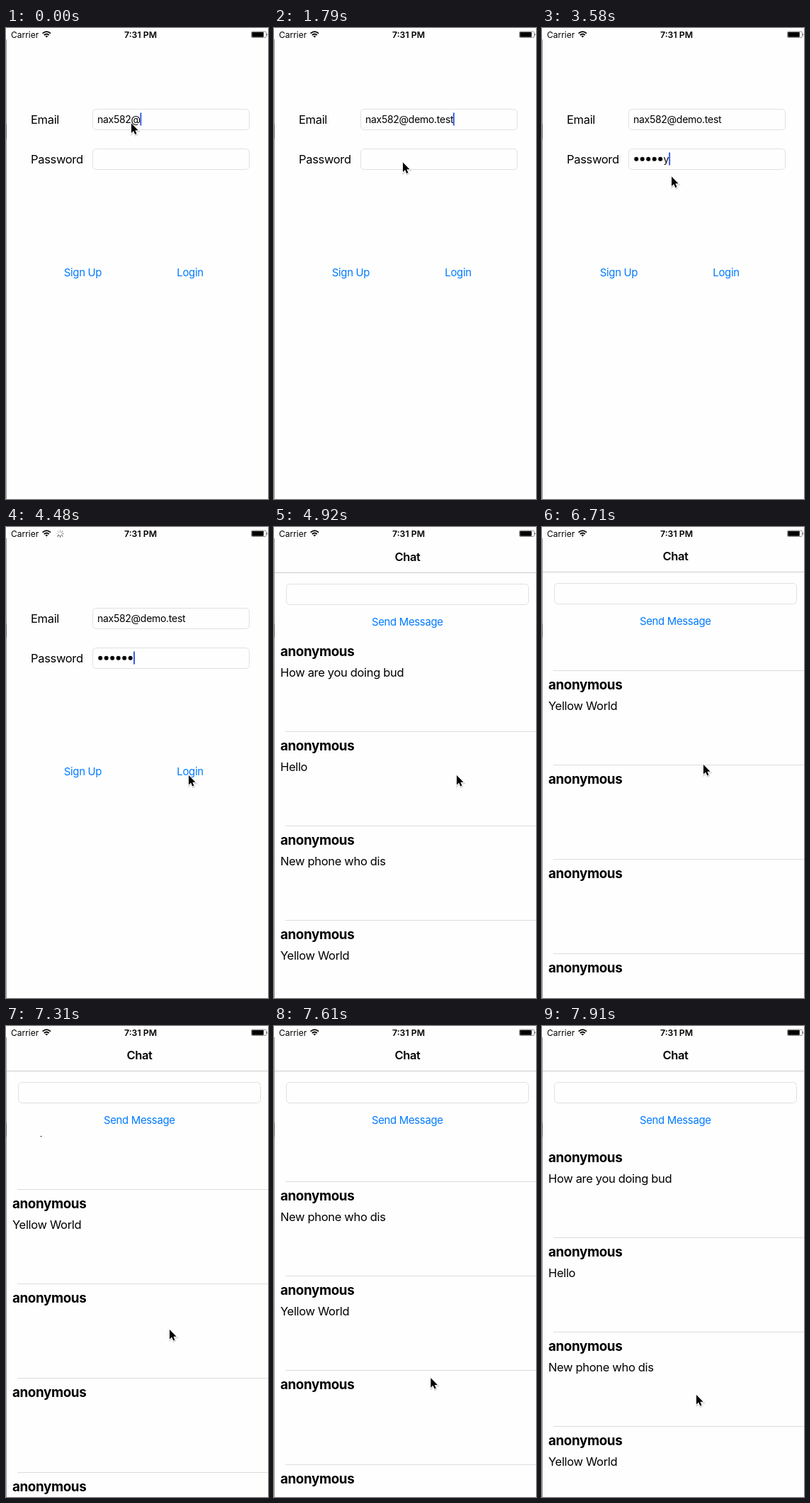
Recreate the animation shown at these times as an HTML page. Size 370 by 664 pixels, loop 8000 ms.

```html
<!DOCTYPE html>
<html lang="en">
<head>
<meta charset="utf-8">
<title>Login and chat</title>
<style>
  html, body { margin: 0; width: 100%; height: 100%; overflow: hidden; background: #fff; }
  svg { display: block; width: 100%; height: 100%; }
  text { font-family: Inter, Roboto, sans-serif; letter-spacing: -.02em; white-space: pre; }
  .label { font-size: 16.5px; }
  .name { font-size: 18.8px; font-weight: 700; }
  .title { font-size: 16.5px; font-weight: 600; text-anchor: middle; }
  .button { font-size: 14.9px; fill: #007aff; text-anchor: middle; }
  .input { font-size: 14px; }
  .status { font-size: 12px; letter-spacing: 0; }
  .clock { font-size: 12.3px; font-weight: 600; text-anchor: middle; }
  .field { fill: #fefefe; stroke: #e0e0e0; }
  .caret { fill: #3a5fe0; }
</style>
</head>
<body>
<svg id="stage" viewBox="0 0 370 664">
  <defs>
    <clipPath id="list"><rect y="155" width="370" height="509"/></clipPath>
    <path id="arrow" d="M0 0V14.6L3.4 11.4L5.7 16.6L8 15.6L5.8 10.6H10.3Z" transform="scale(.93)"/>
  </defs>
  <rect width="370" height="664" fill="#fefefe"/>
  <g id="login"></g>
  <g id="chat">
    <rect width="370" height="664" fill="#fefefe"/>
    <g clip-path="url(#list)"><g id="rows"></g></g>
    <path d="M0 63.5H370" stroke="#cdcdcd"/>
  </g>
  <g id="bar">
    <g fill="none" stroke="#000" stroke-width="1.8">
      <path d="M51.6 7.6Q57.3 2.6 63 7.6M53.8 10Q57.3 6.9 60.8 10"/>
      <path d="M55.4 11.4Q57.3 9.9 59.2 11.4L57.3 13.6Z" fill="#000" stroke="none"/>
    </g>
    <rect x="346.5" y="5" width="21" height="8.5" rx="1.6" fill="#fff" stroke="#555" stroke-width=".6"/>
    <rect x="347.3" y="5.8" width="16.5" height="6.9" rx=".6"/>
    <path d="M368.4 7.5q1.6 1.7 0 3.5z"/>
    <g id="spinner" stroke="#555" stroke-width="1.2" stroke-linecap="round"></g>
  </g>
  <path d="M.5 16V664" stroke="#999"/>
  <path d="M.5 136V156" stroke="#6e6e6e"/>
  <g id="pointer">
    <use href="#arrow" x=".5" y="1.2" fill="none" stroke="#000" stroke-opacity=".16" stroke-width="2.6"/>
    <use href="#arrow" stroke="#fff" stroke-width="1.8" stroke-linejoin="round" paint-order="stroke"/>
  </g>
</svg>
<script>
const LOOP = 8000, STEP = 149.2, ROW = 133;
const $ = id => document.getElementById(id);

function add(parent, tag, attrs, content = '') {
  const node = document.createElementNS('http://www.w3.org/2000/svg', tag);
  for (const key in attrs) node.setAttribute(key, attrs[key]);
  node.textContent = content;
  return parent.appendChild(node);
}
const text = (parent, cls, x, y, content) => add(parent, 'text', { class: cls, x, y }, content);
const box = (parent, x, y, width) =>
  add(parent, 'rect', { class: 'field', x, y, width, height: 29, rx: 5 });
const show = (node, on) => node.setAttribute('visibility', on ? 'visible' : 'hidden');
const toggle = (node, on) => node.setAttribute('display', on ? 'inline' : 'none');
const move = (node, x, y) => node.setAttribute('transform', `translate(${x} ${y})`);

// Login screen
const login = $('login');
function input(label, y) {
  text(login, 'label', 35, y + 20, label);
  box(login, 122.5, y, 221);
  return {
    value: text(login, 'input', 129, y + 19, ''),
    dots: add(login, 'g', {}),
    caret: add(login, 'rect', { class: 'caret', y: y + 5, width: 2, height: 18 })
  };
}
const email = input('Email', 114.5);
const password = input('Password', 170.5);
text(login, 'button', 108.5, 350, 'Sign Up');
const loginButton = text(login, 'button', 260, 350, 'Login');
for (let i = 0; i < 6; i++) add(password.dots, 'circle', { cx: 133.2 + 8.5 * i, cy: 184.7, r: 3 });

// Chat screen
const chat = $('chat'), rows = $('rows');
text(chat, 'title', 188.5, 47, 'Chat');
box(chat, 17.5, 79.5, 342);
text(chat, 'button', 188.3, 137.5, 'Send Message');
const messages = ['How are you doing bud', 'Hello', 'New phone who dis', 'Yellow World', '', '', '', ''];
messages.forEach((message, i) => {
  const y = i * ROW;
  text(rows, 'name', 9, y + 181, 'anonymous');
  text(rows, 'label', 9, y + 210, message);
  add(rows, 'path', { d: `M16 ${y + 287.5}H370`, stroke: '#dcdcdc' });
});

// Status bar
text($('bar'), 'status', 7, 14, 'Carrier');
text($('bar'), 'status clock', 190, 14, '7:31 PM');
const spokes = Array.from({ length: 8 }, (_, i) =>
  add($('spinner'), 'path', { d: 'M0 -2.6V-5', transform: `translate(76.5 9.5) rotate(${i * 45})` }));

// Motion rules; time is counted in steps
const progress = (step, from, to) => Math.min(1, Math.max(0, (step - from) / (to - from)));
const smooth = k => k * k * (3 - 2 * k);
const typed = (step, from, to, count) => Math.round(count * progress(step, from, to));

const moves = [
  { from: 11, to: 12, x: 182, y: 189.5 },
  { from: 23, to: 24, x: 183, y: 209.5 },
  { from: 24, to: 28, x: 258, y: 350 },
  { from: 36, to: 38, x: 235, y: 439 },
  { from: 39, to: 43, x: 228, y: 335 },
  { from: 45, to: 49, x: 231, y: 428 },
  { from: 49, to: 52, x: 218, y: 520 }
];
function pointerAt(step) {
  let x = 177, y = 134.5;
  for (const m of moves) {
    const k = smooth(progress(step, m.from, m.to));
    x += (m.x - x) * k;
    y += (m.y - y) * k;
  }
  return [x, y];
}

// A swipe up that settles, then a pull down that speeds up past the top
const scrollAt = step => Math.round(
  375 * smooth(progress(step, 39.45, 46)) - 386 * progress(step, 46, 53) ** 2.36);

// Critically damped rise of the chat screen
function riseAt(step) {
  const u = 3.6 + 2.65 * (step - 31);
  return Math.round(664 * (1 + u) * Math.exp(-u));
}

function setCaret(field, x, on) {
  field.caret.setAttribute('x', x);
  show(field.caret, on);
}

function drawLogin(step) {
  const length = 7 + typed(step, 0, 4, 4) + typed(step, 5, 8, 4) + typed(step, 9, 10, 1);
  email.value.textContent = 'nax582@demo.test'.slice(0, length);
  setCaret(email, 128.5 + email.value.getComputedTextLength(), step < 13);

  const keys = typed(step, 16, 17, 1) + typed(step, 18, 22, 5);
  const masked = step < 28 ? Math.max(0, keys - 1) : keys;
  const end = 129 + 8.5 * masked;
  [...password.dots.children].forEach((dot, i) => show(dot, i < masked));
  password.value.textContent = 'qwerty'.slice(masked, keys);
  password.value.setAttribute('x', end);
  setCaret(password, end + (masked < keys ? password.value.getComputedTextLength() : 0), keys > 0);
  loginButton.setAttribute('opacity', step === 29 ? .25 : 1);
}

function drawChat(step) {
  toggle(chat, step >= 31);
  toggle(rows, step >= 32);
  move(chat, 0, riseAt(Math.max(31, step)));
  move(rows, 0, -scrollAt(step));
}

function render(time) {
  const step = Math.floor((time + 10) / STEP);
  drawLogin(step);
  drawChat(step);
  show($('spinner'), step >= 30 && step < 33);
  spokes.forEach((spoke, i) => spoke.setAttribute('opacity', .25 + .75 * ((i - step + 80) % 8) / 7));
  move($('pointer'), ...pointerAt(step));
}

const start = performance.now();
function tick() {
  render((performance.now() - start) % LOOP);
  requestAnimationFrame(tick);
}
tick();
</script>
</body>
</html>
```
